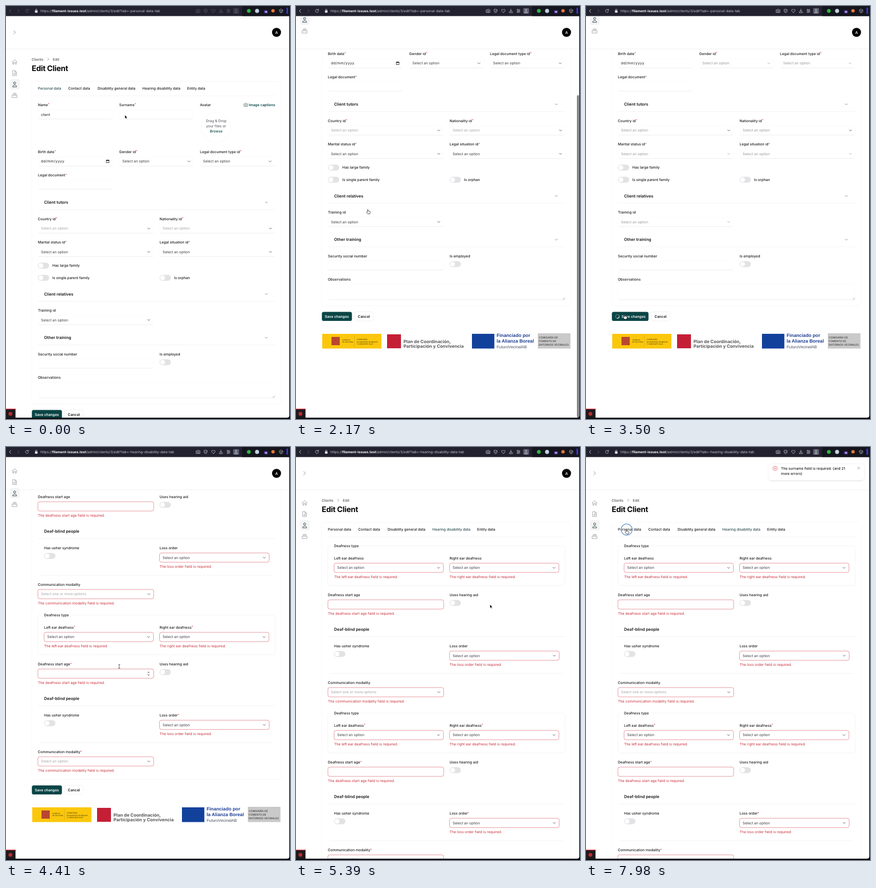
These frames come from a looping animation (552 by 800 pixels, 8000 ms). An HTML page:

```html
<!DOCTYPE html>
<html lang="en">
<head>
<meta charset="utf-8">
<title>Edit Client</title>
<style>
html, body { margin: 0; width: 100%; height: 100%; overflow: hidden; background: #fff; }
svg { display: block; width: 552px; height: 800px; font-family: Inter, "Noto Sans", sans-serif; text-rendering: geometricPrecision; }
.line { fill: none; stroke-linecap: round; stroke-linejoin: round; }
.busy .opt { fill: #97979c; }
.busy .chev { stroke: #acacb1; }
.busy .cal { display: none; }
</style>
</head>
<body>
<svg id="stage" viewBox="0 0 552 800">
  <defs><clipPath id="view"><rect y="83" width="551" height="717"/></clipPath></defs>
</svg>
<script>
const LOOP = 8000, SIZE = 6.93;
const INK = '#18181b', TEAL = '#0b4546', ACTIVE = '#27484b', RED = '#c92b37', FAINT = '#f0f0f2';
const stage = document.getElementById('stage');

function el(parent, tag, attrs = {}, text) {
  const node = document.createElementNS('http://www.w3.org/2000/svg', tag);
  for (const k in attrs) node.setAttribute(k, attrs[k]);
  if (text) node.textContent = text;
  parent.append(node);
  return node;
}
const group = (p, attrs) => el(p, 'g', attrs);
const rect = (p, x, y, width, height, fill, attrs) => el(p, 'rect', { x, y, width, height, fill, ...attrs });
const circle = (p, cx, cy, r, fill, attrs) => el(p, 'circle', { cx, cy, r, fill, ...attrs });
const line = (p, d, stroke = INK, w = 0.8, attrs) => el(p, 'path', { d, stroke, 'stroke-width': w, class: 'line', ...attrs });
// y is the middle of the capital letters
function text(p, x, y, str, o = {}) {
  const { size = SIZE, ...rest } = o;
  return el(p, 'text', { x, y: y + size * 0.36, 'font-size': size, 'font-weight': 500, fill: INK, ...rest }, str);
}
const move = (node, x, y) => node.setAttribute('transform', `translate(${x} ${y})`);
const show = (node, on) => node.setAttribute('display', on ? 'inline' : 'none');

function label(p, x, y, str, need) {
  const t = text(p, x, y, str);
  if (need) el(t, 'tspan', { fill: RED, dy: -1.4, dx: 0.2, 'font-size': 5.4 }, '*');
}
function box(p, x, y, w, h, bad) {
  rect(p, x, y, w, h, '#fff', { rx: 3.5, stroke: bad ? '#dc737b' : '#f8f8f9', 'stroke-width': bad ? 0.75 : 0.6 });
  if (!bad) line(p, `M${x + 2} ${y + h}H${x + w - 2}`, '#e4e4e7', 0.6);
}
const chevron = (p, x, y, c = '#55555b', attrs) => line(p, `M${x - 2.2} ${y - 1.1}L${x} ${y + 1.2}L${x + 2.2} ${y - 1.1}`, c, 0.9, attrs);
function select(p, x, y, w, o = {}) {
  box(p, x, y - 9, w, 18, o.bad);
  text(p, x + 6, y, o.hint || 'Select an option', { 'font-weight': 400, fill: o.soft ? '#a3a3a8' : '#3a3a40', class: 'opt' });
  chevron(p, x + w - 9.5, y, '#55555b', { class: o.soft ? 'line' : 'line chev' });
}
const error = (p, x, y, name) => text(p, x, y, `The ${name} field is required.`, { 'font-weight': 400, fill: RED });
function toggle(p, x, y, str) {
  rect(p, x, y - 5.7, 22, 11.4, '#e3e3e6', { rx: 5.7 });
  circle(p, x + 5.8, y, 5, '#fff', { stroke: '#d4d4d8', 'stroke-width': 0.4 });
  if (str) text(p, x + 28, y, str);
}
const rule = (p, x, y, w) => line(p, `M${x} ${y}H${x + w}`, FAINT, 0.7);
function section(p, y, str, fold) {
  text(p, 74, y, str, { size: 7.92, 'font-weight': 600 });
  rule(p, 62, y + 14, 461);
  if (fold) chevron(p, 506, y, '#85858c');
}

// ---- page ----
rect(stage, 0, 0, 552, 800, '#fff');
const view = group(stage, { 'clip-path': 'url(#view)' });
const page = group(view);

text(page, 50, 103.3, 'Clients', { fill: '#55555c' });
line(page, 'M81 101L83.2 103.2L81 105.4', '#77777d');
text(page, 91, 103.3, 'Edit', { fill: '#55555c' });
text(page, 50, 121, 'Edit Client', { size: 14.85, 'font-weight': 700, 'letter-spacing': -0.3, fill: '#09090b' });
const card = rect(page, 50, 146, 485, 625, 'none', { rx: 6, stroke: '#f4f4f5', 'stroke-width': 0.7 });
rule(page, 62, 174, 461);
const tabs = [[62, 'Personal data'], [121, 'Contact data'], [178, 'Disability general data'],
  [265, 'Hearing disability data'], [352, 'Entity data']].map(([x, s]) => text(page, x, 159.5, s));

function buildPersonal(p) {
  label(p, 62, 191.3, 'Name', 1);
  box(p, 62, 201, 145, 18);
  text(p, 68, 210.3, 'client', { 'font-weight': 400 });
  label(p, 220, 191.3, 'Surname', 1);
  box(p, 220, 201, 145, 18);
  label(p, 377, 191.3, 'Avatar');
  line(p, 'M462.8 189.6H464.4L465.2 188.4H467.6L468.4 189.6H469.6V194.4H462.8Z', TEAL, 0.6);
  circle(p, 466.2, 191.8, 1.4, 'none', { stroke: TEAL, 'stroke-width': 0.6 });
  text(p, 472, 191.3, 'Image captions', { 'font-weight': 600, fill: TEAL });
  circle(p, 408.5, 235, 29, '#fff', { stroke: '#f4f4f5', 'stroke-width': 0.7 });
  ['Drag & Drop', 'your files or', 'Browse'].forEach((s, i) =>
    text(p, 408.5, 223 + i * 9.9, s, { 'text-anchor': 'middle', 'font-weight': i > 1 ? 500 : 400, fill: i > 1 ? TEAL : '#4d4d55' }));

  label(p, 62, 282.3, 'Birth date', 1);
  box(p, 62, 292, 145, 18);
  text(p, 68, 301, 'dd/mm/yyyy', { 'font-weight': 400, 'letter-spacing': 0.45 });
  const cal = group(p, { class: 'cal' });
  rect(cal, 195, 298.6, 5.2, 4.8, 'none', { stroke: '#111', 'stroke-width': 0.8 });
  rect(cal, 195, 298, 5.2, 1.8, '#111');
  label(p, 220, 282.3, 'Gender id', 1);
  select(p, 220, 301, 145);
  label(p, 377, 282.3, 'Legal document type id', 1);
  select(p, 377, 301, 146);
  label(p, 62, 327.6, 'Legal document', 1);
  box(p, 62, 337, 145, 18);

  section(p, 380.5, 'Client tutors', 1);
  const pair = (y, a, b, soft) => [[62, a], [298.5, b]].forEach(([x, s]) => {
    label(p, x, y, s, 1);
    select(p, x, y + 18.8, 225, { soft });
  });
  pair(412.2, 'Country id', 'Nationality id', 1);
  pair(457.6, 'Marital status id', 'Legal situation id');
  toggle(p, 62, 503, 'Has large family');
  toggle(p, 62, 526.5, 'Is single parent family');
  toggle(p, 298.5, 526.5, 'Is orphan');
  section(p, 558, 'Client relatives', 1);
  label(p, 62, 589.5, 'Training id');
  select(p, 62, 608.2, 225);
  section(p, 642.6, 'Other training', 1);
  label(p, 62, 674.4, 'Security social number');
  box(p, 62, 683.5, 225, 18);
  label(p, 298.5, 674.4, 'Is employed');
  toggle(p, 298.5, 690);
  label(p, 62, 719.5, 'Observations');
  box(p, 62, 729, 461, 30);
  line(p, 'M518.5 758.5L522 755M520.5 758.7L522.2 757', '#8a8a90', 0.6);
}

function buildHearing(p, need) {
  rect(p, 62, 191.5, 461, 77, 'none', { rx: 5, stroke: FAINT, 'stroke-width': 0.7 });
  rect(p, 70, 187, 56, 9, '#fff');
  label(p, 74, 191.5, 'Deafness type');
  [[74, 'Left'], [298.5, 'Right']].forEach(([x, side]) => {
    label(p, x, 215.2, side + ' ear deafness', need);
    select(p, x, 234, 212.5, { bad: 1 });
    error(p, x, 251.7, side.toLowerCase() + ' ear deafness');
  });
  label(p, 62, 286.5, 'Deafness start age', need);
  box(p, 62, 296, 225, 18, 1);
  error(p, 62, 323, 'deafness start age');
  label(p, 298.5, 286.5, 'Uses hearing aid');
  toggle(p, 298.5, 302);
  section(p, 353.3, 'Deaf-blind people');
  label(p, 74, 385.5, 'Has usher syndrome');
  toggle(p, 74, 401);
  label(p, 298.5, 385.5, 'Loss order', need);
  select(p, 298.5, 404.2, 213, { bad: 1 });
  error(p, 298.5, 422, 'loss order');
  rule(p, 66, 438.5, 453);
  label(p, 62, 456.5, 'Communication modality', need);
  select(p, 62, 475, 225, { bad: 1, soft: 1, hint: need ? '' : 'Select one or more options' });
  error(p, 62, 493, 'communication modality');
}

const personal = group(page), hearing = group(page);
buildPersonal(personal);
buildHearing(hearing);
const second = group(hearing, { transform: 'translate(0 324)' });
buildHearing(second, 1);
const stepper = line(second, 'M275.6 303.2L277 301.6L278.4 303.2M275.6 306.8L277 308.4L278.4 306.8', '#222', 0.9);

// ---- buttons and footer ----
const foot = group(page);
const save = rect(foot, 50.3, 782.5, 58.4, 17.5, TEAL, { rx: 3.6 });
const saveText = text(foot, 56, 791.3, 'Save changes', { 'font-weight': 600, fill: '#fff' });
const spin = group(foot);
circle(spin, 0, 0, 3.6, 'none', { stroke: '#fff', 'stroke-opacity': 0.3, 'stroke-width': 1.2 });
line(spin, 'M-3.6 0A3.6 3.6 0 0 1 0 -3.6', '#fff', 1.2);
const cancel = group(foot);
rect(cancel, 114, 782.5, 36.5, 17.5, '#fff', { rx: 3.6, stroke: '#ebebee', 'stroke-width': 0.7 });
text(cancel, 120.3, 791.3, 'Cancel', { 'font-weight': 600 });

rect(foot, 51, 825, 115, 28.5, '#fbc70c');
rect(foot, 69, 831, 16, 16, '#b9472f');
line(foot, 'M113.5 829V849', '#b89620', 0.5);
const rows = (x, y, gap, list, o) => list.forEach((s, i) => text(foot, x, y + i * gap, s, o));
rows(90, 836.5, 4.6, ['CONSEJO', 'DE VALDORIA'], { size: 3.2, fill: '#4d3f10' });
rows(118, 836.3, 4.4, ['CONSEJERÍA', 'DE ASUNTOS VECINALES', 'Y HORIZONTE 2045'], { size: 3.3, fill: '#4d3f10' });
rect(foot, 177, 826, 27, 27, '#c51f36');
rows(209, 839.5, 9.8, ['Plan de Coordinación,', 'Participación y Convivencia'], { size: 8.6, 'font-weight': 700, fill: '#58585c' });
rect(foot, 342, 825, 43.5, 28.5, '#12419c');
const arial = '"Liberation Sans", Arial, sans-serif';
rows(390, 827.8, 10.6, ['Financiado por', 'la Alianza Boreal'], { size: 9.1, 'font-weight': 700, fill: '#1d3f94', 'font-family': arial });
text(foot, 390, 850.5, 'FuturoVecinalAB', { size: 7.9, 'font-weight': 400, fill: '#4a4f62', 'font-family': arial });
rect(foot, 470, 824, 63.5, 29.5, '#c9c9c9');
rows(472, 832.3, 6.9, ['COMISARÍA DE', 'FOMENTO DE', 'ENTORNOS VECINALES'], { size: 5.1, fill: '#3c3c3c' });

// ---- fixed header, sidebar, toast ----
rect(stage, 0, 19, 551, 64, '#fff');
line(stage, 'M0 83H551', '#ececee', 0.7);
circle(stage, 525.8, 51, 8.8, '#050506');
text(stage, 525.8, 51.2, 'A', { size: 7.4, 'text-anchor': 'middle', fill: '#fff' });

const side = group(stage);
rect(side, 8, 141.5, 18.5, 20, '#f4f4f5', { rx: 3.5 });
line(side, 'M15 47.5L18.4 51L15 54.5', '#85858c', 0.9);
line(side, 'M12 108.5L16.7 103.8L21.4 108.5M13.3 107.5V112.6H15.3V109.4H18.1V112.6H20.1V107.5', '#94949b');
line(side, 'M13.2 125.2H17.6L20.4 128V134.8H13.2ZM17.4 125.4V128.2H20.2M15 130.6H18.6M15 132.4H18.6', '#94949b');
line(side, 'M12.9 156.3C12.9 151.9 20.7 151.9 20.7 156.3ZM14.7 149.2A2.1 2.1 0 1 1 18.9 149.2A2.1 2.1 0 1 1 14.7 149.2', '#263c3f', 0.9);
line(side, 'M12.2 173H21.4V177.4H12.2ZM13 171.1H20.6M14 169.2H19.6', '#94949b');

const toast = group(stage);
rect(toast, 355, 36, 185, 31, '#000', { rx: 6, opacity: 0.05 });
rect(toast, 354, 32.5, 187.5, 32, '#fff', { rx: 6, stroke: '#ededf0', 'stroke-width': 0.7 });
circle(toast, 367.5, 41.3, 4.2, 'none', { stroke: '#d9454f', 'stroke-width': 0.8 });
line(toast, 'M366 39.8L369 42.8M369 39.8L366 42.8', '#d9454f');
text(toast, 379, 41.3, 'The surname field is required. (and 21');
text(toast, 379, 51.2, 'more errors)');
line(toast, 'M527.8 38.6L532 42.8M532 38.6L527.8 42.8', '#8b8b92');

const bar = rect(stage, 546, 20, 4, 600, '#858588', { rx: 2 });

// ---- browser frame ----
rect(stage, 0, 0, 552, 19.5, '#21212f');
rect(stage, 459, 0, 93, 19.5, '#15151e');
el(stage, 'path', { d: 'M0 797.6H546Q550.6 797.6 550.6 793V19H552V800H0Z', fill: '#0a0a0d' });
rect(stage, 0, 780, 18.5, 18, '#1b1a1f');
rect(stage, 0, 780, 18.5, 1.4, '#d8303a');
circle(stage, 8.5, 790, 3.8, '#b92c2d');

const tools = group(stage);
const icon = (d, w = 0.8) => line(tools, d, '#d6d6de', w);
icon('M9.2 6.6L6.6 9.5L9.2 12.4', 1);
icon('M43.4 7.7A3 3 0 1 0 43.8 10.2M43.8 6V8.1H41.7');
icon('M370 7.6H371.5L372.4 6.3H374.6L375.5 7.6H377V12.5H370ZM372.2 9.9A1.3 1.3 0 1 0 374.8 9.9A1.3 1.3 0 1 0 372.2 9.9');
icon('M388 6.2L391 7.2V9.6Q390.8 12 388 13Q385.2 12 385 9.6V7.2ZM386.7 9.6L387.7 10.6L389.4 8.6');
icon('M403 12.8L399.8 9.4C398.6 7.4 401.4 5.2 403 7.5C404.6 5.2 407.4 7.4 406.2 9.4Z');
icon('M417.7 6V10.6M415.7 8.9L417.7 10.8L419.7 8.9M414.6 11V12.8H420.8V11');
icon('M429.4 7H435.4M429.4 9.5H435.4M429.4 12H435.4M431 6.2V7.8M433.8 8.7V10.3M431.4 11.2V12.8');
rect(tools, 441.5, 4, 11.5, 11, '#5c5e70', { rx: 2 });
icon('M444.6 12.6C444.6 9.6 449.8 9.6 449.8 12.6ZM445.9 7.6A1.3 1.3 0 1 1 448.5 7.6A1.3 1.3 0 1 1 445.9 7.6');
line(stage, 'M23 6.6L25.6 9.5L23 12.4', '#5a5b68', 1);
rect(stage, 56.3, 8.6, 5, 4.4, '#dcdce2', { rx: 0.7 });
line(stage, 'M57.4 8.6V7.4A1.4 1.4 0 0 1 60.2 7.4V8.6', '#dcdce2');
const url = text(stage, 67, 9.6, '', { size: 6.7, 'font-weight': 400, fill: '#c9cad3' });
el(url, 'tspan', {}, 'https://');
el(url, 'tspan', { 'font-weight': 700, fill: '#fff' }, 'filament-issues.test');
const path = el(url, 'tspan', {}, '/');
circle(stage, 472, 9.5, 3.7, '#2fb344');
circle(stage, 488, 9.5, 3.9, '#c3d2e4');
rect(stage, 501.5, 8.3, 7.5, 6, '#4b2a9c', { rx: 1.4 });
text(stage, 505.2, 11.4, '14', { size: 4.6, 'text-anchor': 'middle', 'font-weight': 700, fill: '#fff' });
circle(stage, 519, 9.2, 3.3, '#e2783a');
line(stage, 'M534.8 5.9L538 7.7V11.3L534.8 13.1L531.6 11.3V7.7ZM531.8 7.8L534.8 9.5L537.8 7.8M534.8 9.5V13', '#c8c8d0', 0.7);
rect(stage, 545.2, 3, 3, 12, '#3d35d6', { rx: 1 });

// ---- pointer ----
const ring = circle(stage, 0, 0, 10.8, 'none', { stroke: '#86abd9', 'stroke-width': 1.8 });
const pointer = group(stage);
const shapes = {
  arrow: el(pointer, 'path', { d: 'M0 0V7.2L1.7 5.7L2.8 8.2L4 7.7L2.9 5.2H5.1Z', fill: '#0c0c0c', stroke: '#fff', 'stroke-width': 0.6 }),
  hand: el(pointer, 'path', {
    d: 'M-1.2 4.6V0.6Q-0.5 -0.5 0.2 0.6V3Q1 2.4 1.7 3.2Q2.6 2.7 3.1 3.6Q4.2 3.2 4.3 4.4V6.2L3.4 8.4H-0.6L-3 5.4Q-2.6 4.1 -1.2 4.6Z',
    fill: '#fff', stroke: '#222', 'stroke-width': 0.8 }),
  beam: line(pointer, 'M-1.5 -3.6Q0 -3.6 0 -2.6Q0 -3.6 1.5 -3.6M0 -2.6V2.8M-1.5 3.8Q0 3.8 0 2.8Q0 3.8 1.5 3.8', '#333', 0.8)
};

// ---- timeline: [time, value...] ----
const SCROLL = [[1540, 0], [1890, 190], [4550, 190], [4960, 0]];
const BAR = [[1540, 0], [1610, 1], [2260, 1], [2540, 0], [4550, 0], [4620, 1], [5060, 1], [5300, 0],
  [5950, 0], [6020, 1], [7140, 1], [7350, 0]];
const TOAST = [[5740, 0], [5950, 1]];
const MOUSE = [[490, 231, 211], [1400, 152, 370], [2030, 152, 370], [2170, 140, 394.3], [2660, 75.4, 598.2],
  [3850, 75.4, 598.2], [4340, 220, 425], [4550, 220, 425], [5040, 382, 318], [5250, 382, 318], [5390, 377, 305],
  [6440, 315, 138], [6860, 306, 144], [7140, 306, 144], [7700, 79, 160]];
const SHAPE = [[0, 'arrow'], [2100, 'hand'], [2240, 'arrow'], [2600, 'hand'], [3920, 'arrow'],
  [4200, 'beam'], [4620, 'arrow'], [7560, 'hand']];
const CLICKS = [[2700, 2870], [7840, 8000]];
const SAVING = [2800, 3850];

function track(list, t) {
  const i = list.findIndex(k => k[0] > t);
  if (i < 0) return list[list.length - 1].slice(1);
  if (i === 0) return list[0].slice(1);
  const a = list[i - 1], b = list[i], u = (t - a[0]) / (b[0] - a[0]), e = u * u * (3 - 2 * u);
  return a.slice(1).map((v, j) => v + (b[j + 1] - v) * e);
}

function draw(t) {
  const busy = t >= SAVING[0] && t < SAVING[1], failed = t >= SAVING[1];
  const grow = failed ? 63 : 0, [scroll] = track(SCROLL, t);
  stage.classList.toggle('busy', busy);
  show(personal, !failed);
  show(hearing, failed);
  tabs[0].setAttribute('fill', failed ? INK : ACTIVE);
  tabs[3].setAttribute('fill', failed ? ACTIVE : INK);
  path.textContent = `/admin/clients/3/edit?tab=-${failed ? 'hearing-disability' : 'personal'}-data-tab`;
  card.setAttribute('height', 625 + grow);
  move(foot, 0, grow);
  move(page, 0, -scroll);
  move(side, 0, Math.min(0, 65 + grow - scroll));

  save.setAttribute('width', busy ? 71.2 : 58.4);
  saveText.setAttribute('x', busy ? 69 : 56);
  move(cancel, busy ? 13 : 0, 0);
  show(spin, busy);
  spin.setAttribute('transform', `translate(61 791.3) rotate(${t * 0.36 % 360})`);
  show(stepper, t >= 4270 && t < 4620);

  const total = 967 + grow;
  bar.setAttribute('y', 20 + scroll / total * 777);
  bar.setAttribute('height', 777 * 777 / total);
  bar.setAttribute('opacity', track(BAR, t)[0]);
  const [shown] = track(TOAST, t);
  toast.setAttribute('opacity', shown);
  move(toast, (1 - shown) * 60, 0);
  tools.setAttribute('opacity', t < 70 ? 0.35 : 1);

  const [x, y] = track(MOUSE, t);
  move(pointer, x, y);
  move(ring, x, y);
  show(ring, CLICKS.some(([a, b]) => t >= a && t < b));
  const kind = SHAPE.filter(k => k[0] <= t).pop()[1];
  for (const k in shapes) show(shapes[k], k === kind);
}

const start = performance.now();
function tick() {
  draw((performance.now() - start) % LOOP);
  requestAnimationFrame(tick);
}
draw(0);
requestAnimationFrame(tick);
</script>
</body>
</html>
```
